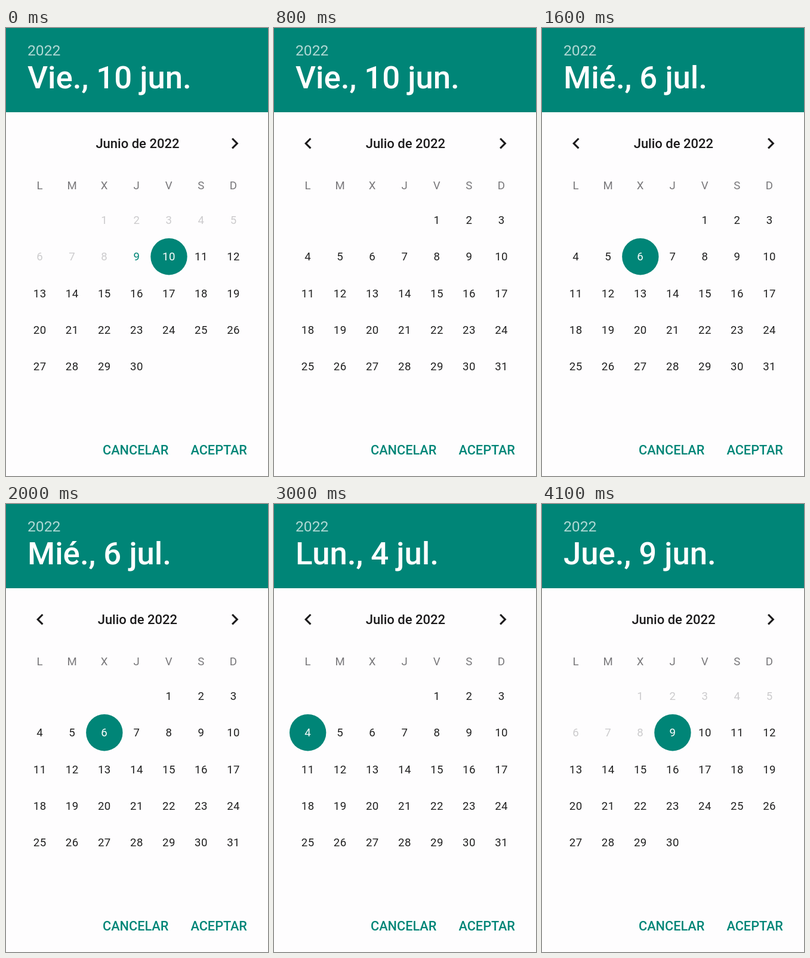
An HTML page for the animation above (4200 ms loop, 439x750 px).

```html
<!DOCTYPE html>
<html lang="es">
<head>
<meta charset="utf-8">
<title>Calendario</title>
<style>
  html, body { margin: 0; width: 100%; height: 100%; overflow: hidden; background: #fefdfe; }
  svg { display: block; font-family: Roboto, sans-serif; }
  .year { font-size: 24.7px; fill: #b0d9d5; }
  .date { font-size: 52.7px; font-weight: 500; fill: #fff; }
  .title { font-size: 22px; font-weight: 500; fill: #1c1b1c; text-anchor: middle; }
  .day, .week { font-size: 18.6px; letter-spacing: .5px; text-anchor: middle; fill: #212121; }
  .week { fill: #78777a; }
  .past { fill: #cccbcd; }
  .today { fill: #008577; }
  .on { fill: #fff; }
  .button { font-size: 21.7px; font-weight: 500; fill: #008577; }
  .arrow { fill: #1c1b1c; }
</style>
</head>
<body>
<svg id="stage" width="439" height="750" viewBox="0 0 439 750">
  <rect width="439" height="750" fill="#fefdfe"/>
  <rect width="439" height="141" fill="#008577"/>
  <text class="year" x="36" y="46.3">2022</text>
  <text class="date" id="date" x="36" y="101"></text>
  <circle id="nextRipple" cx="380.5" cy="193.5" r="43"/>
  <circle id="prevRipple" cx="57" cy="193.5" r="43"/>
  <path class="arrow" id="prev" transform="translate(38.6 174.6) scale(1.55)"
        d="M15.41 7.41 14 6 8 12 14 18 15.41 16.59 10.83 12z"/>
  <path class="arrow" transform="translate(364.7 174.6) scale(1.55)"
        d="M10 6 8.59 7.41 13.17 12 8.59 16.59 10 18 16 12z"/>
  <circle id="mark" r="30.7" fill="#008577"/>
  <text class="button" x="162" y="714.3">CANCELAR</text>
  <text class="button" x="309.5" y="714.3">ACEPTAR</text>
</svg>
<script>
const LOOP = 4200;
const stage = document.getElementById('stage');
const $ = id => document.getElementById(id);

const months = [
  { name: 'Junio de 2022', start: 2, length: 30, today: 9 },
  { name: 'Julio de 2022', start: 4, length: 31, today: 0 }
];

// [time, month shown, selected day in that month, heading]
const steps = [
  [0, 0, 10, 'Vie., 10 jun.'],
  [400, 1, 0, 'Vie., 10 jun.'],
  [1500, 1, 6, 'Mié., 6 jul.'],
  [2100, 1, 4, 'Lun., 4 jul.'],
  [3300, 0, 0, 'Lun., 4 jul.'],
  [3900, 0, 9, 'Jue., 9 jun.']
];

function add(parent, tag, attrs, text = '') {
  const node = document.createElementNS('http://www.w3.org/2000/svg', tag);
  for (const key in attrs) node.setAttribute(key, attrs[key]);
  node.textContent = text;
  return parent.appendChild(node);
}

const columnX = col => 56.7 + col * 54.07;
const rowY = row => 321.5 + row * 61.1;

function cell(month, day) {
  const index = month.start + day - 1;
  return { x: columnX(index % 7), y: rowY(Math.floor(index / 7)) };
}

[...'LMXJVSD'].forEach((letter, col) =>
  add(stage, 'text', { class: 'week', x: columnX(col), y: 269.8 }, letter));

for (const month of months) {
  month.group = add(stage, 'g', {});
  add(month.group, 'text', { class: 'title', x: 220.4, y: 200.8 }, month.name);
  month.days = [];
  for (let day = 1; day <= month.length; day++) {
    const { x, y } = cell(month, day);
    const kind = day < month.today ? ' past' : day === month.today ? ' today' : '';
    month.days[day] = add(month.group, 'text', { class: 'day' + kind, x, y: y + 6.8 }, day);
  }
}

let current = null;

function show(step) {
  if (step === current) return;
  current = step;
  const [, shown, selected, heading] = step;
  $('date').textContent = heading;
  $('prev').style.display = shown ? '' : 'none';
  months.forEach((month, i) => {
    month.group.style.display = i === shown ? '' : 'none';
    month.days.forEach((node, day) =>
      node.classList.toggle('on', i === shown && day === selected));
  });
  $('mark').style.display = selected ? '' : 'none';
  if (selected) {
    const { x, y } = cell(months[shown], selected);
    $('mark').setAttribute('cx', x);
    $('mark').setAttribute('cy', y + 1 - .9);
  }
}

const clamp = v => Math.max(0, Math.min(1, v));
const pulse = (t, from, to, fade) =>
  .12 * clamp((t - from) / 80) * (1 - clamp((t - to) / fade));

function render(t) {
  show(steps.filter(step => step[0] <= t).pop());
  $('nextRipple').setAttribute('fill-opacity', pulse(t, 220, 580, 200));
  $('prevRipple').setAttribute('fill-opacity', pulse(t, 3080, 3299, 1));
}

const begin = performance.now();
function frame() {
  render((performance.now() - begin) % LOOP);
  requestAnimationFrame(frame);
}
render(0);
requestAnimationFrame(frame);
</script>
</body>
</html>
```
